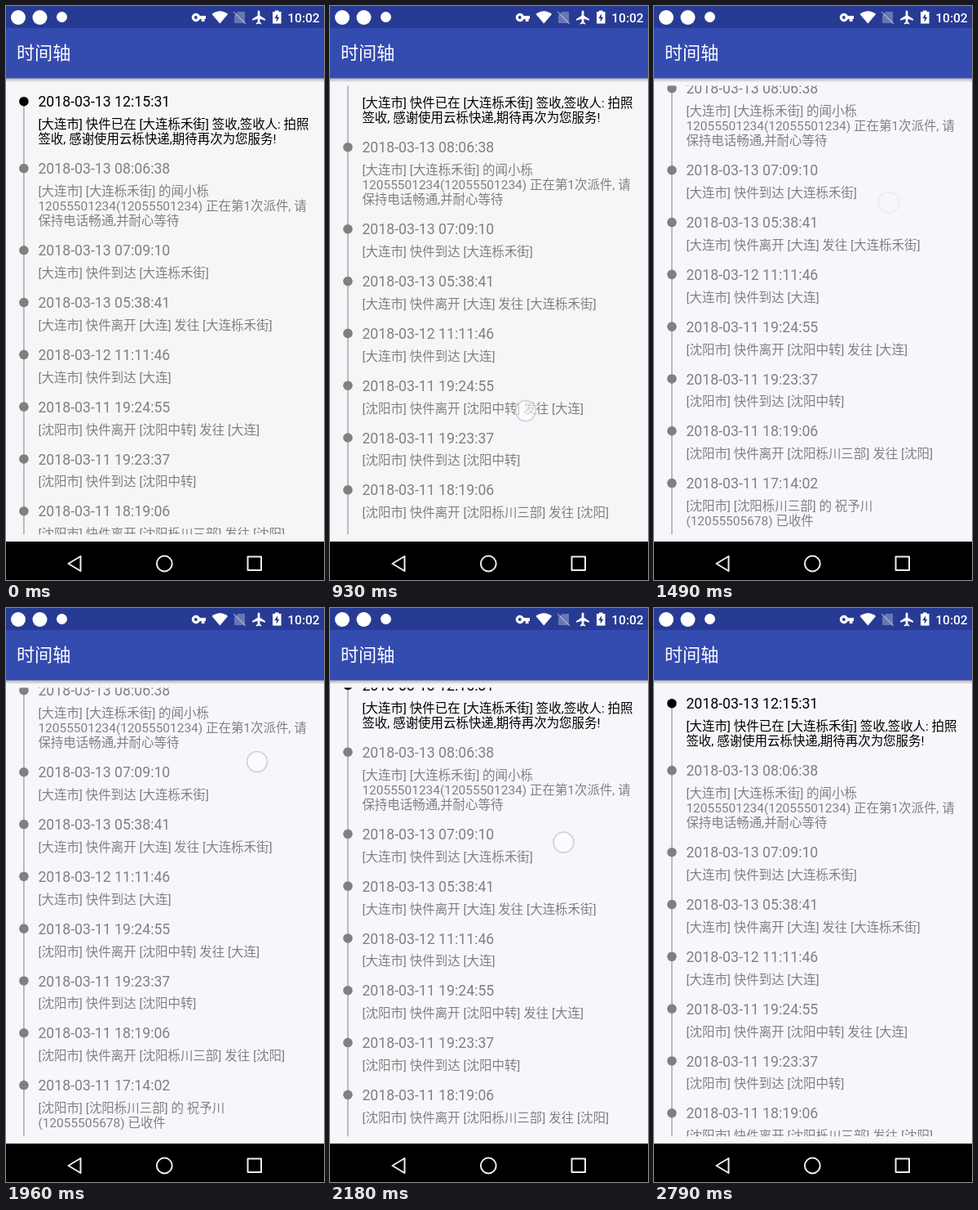
Recreate the animation shown at these times as an HTML page with a canvas. Size 390x702 px, loop 2870 ms.

```html
<!DOCTYPE html>
<html lang="zh-CN">
<head>
<meta charset="utf-8">
<title>时间轴</title>
<style>
html, body { margin: 0; width: 100%; height: 100%; overflow: hidden; background: #000; }
canvas { display: block; width: 390px; height: 702px; }
</style>
</head>
<body>
<canvas id="stage"></canvas>
<script>
const W = 390, H = 702, LOOP = 2870;
const FONT = 'Roboto, "Noto Sans CJK SC", "Noto Sans CJK", sans-serif';
const LIST_TOP = 97.5, LIST_BOTTOM = 646.3, LINE_HEIGHT = 18.15, ROW_BASE = 45.65;
const MAX_SCROLL = 98, DRAG_SLACK = 23, FADE = 200;

const canvas = document.getElementById('stage');
const ctx = canvas.getContext('2d');
const ratio = window.devicePixelRatio || 1;
canvas.width = W * ratio;
canvas.height = H * ratio;

const rows = [
  ['2018-03-13 12:15:31', '[大连市] 快件已在 [大连栎禾街] 签收,签收人: 拍照', '签收, 感谢使用云栎快递,期待再次为您服务!'],
  ['2018-03-13 08:06:38', '[大连市] [大连栎禾街] 的闻小栎', '12055501234(12055501234) 正在第1次派件, 请', '保持电话畅通,并耐心等待'],
  ['2018-03-13 07:09:10', '[大连市] 快件到达 [大连栎禾街]'],
  ['2018-03-13 05:38:41', '[大连市] 快件离开 [大连] 发往 [大连栎禾街]'],
  ['2018-03-12 11:11:46', '[大连市] 快件到达 [大连]'],
  ['2018-03-11 19:24:55', '[沈阳市] 快件离开 [沈阳中转] 发往 [大连]'],
  ['2018-03-11 19:23:37', '[沈阳市] 快件到达 [沈阳中转]'],
  ['2018-03-11 18:19:06', '[沈阳市] 快件离开 [沈阳栎川三部] 发往 [沈阳]'],
  ['2018-03-11 17:14:02', '[沈阳市] [沈阳栎川三部] 的 祝予川', '(12055505678) 已收件']
];

// Finger paths as [time, x, y]
const swipeUp = [[850, 231, 544], [1100, 259, 391], [1340, 288, 240]];
const swipeDown = [[1960, 308, 188], [2100, 293, 249], [2430, 266, 404], [2590, 256, 462]];

const ticks = [0, 850, 930, 1020, 1100, 1180, 1250, 1330, 1410, 1480, 1540,
  1960, 2030, 2100, 2180, 2260, 2350, 2430, 2510, 2580, 2650, 2720, 2790];

const clamp = (v, lo, hi) => Math.min(hi, Math.max(lo, v));

function along(path, t) {
  const first = path[0], last = path[path.length - 1];
  t = clamp(t, first[0], last[0]);
  let i = 1;
  while (t > path[i][0]) i++;
  const a = path[i - 1], b = path[i], k = (t - a[0]) / (b[0] - a[0]);
  return { x: a[1] + (b[1] - a[1]) * k, y: a[2] + (b[2] - a[2]) * k };
}

function scrollAt(t) {
  if (t < 1960) return clamp(swipeUp[0][2] - along(swipeUp, t).y - DRAG_SLACK, 0, MAX_SCROLL);
  return MAX_SCROLL - clamp(along(swipeDown, t).y - swipeDown[0][2] - DRAG_SLACK, 0, MAX_SCROLL);
}

function text(str, x, y, size, color, weight = 400) {
  ctx.font = `${weight} ${size}px ${FONT}`;
  ctx.fillStyle = color;
  ctx.fillText(str, x, y);
}

function rect(x, y, w, h, color) {
  ctx.fillStyle = color;
  ctx.fillRect(x, y, w, h);
}

function disc(x, y, r, color) {
  ctx.fillStyle = color;
  ctx.beginPath();
  ctx.arc(x, y, r, 0, Math.PI * 2);
  ctx.fill();
}

function shape(d, color, x = 0, y = 0) {
  ctx.save();
  ctx.translate(x, y);
  ctx.fillStyle = color;
  ctx.fill(new Path2D(d), 'evenodd');
  ctx.restore();
}

function drawList(scroll) {
  ctx.save();
  ctx.beginPath();
  ctx.rect(0, LIST_TOP, W, LIST_BOTTOM - LIST_TOP);
  ctx.clip();
  let y = LIST_TOP - scroll;
  rect(21.4, y + 19.5, 1.1, 700, '#8c8c90');
  rows.forEach(([date, ...lines], i) => {
    const color = i ? '#808083' : '#000';
    disc(21.9, y + 19.2, 5.8, color);
    text(date, 39.4, y + 25.8, 17.7, color);
    lines.forEach((line, n) => text(line, 39.4, y + 52.6 + n * LINE_HEIGHT, 15.46, color));
    y += ROW_BASE + lines.length * LINE_HEIGHT;
  });
  ctx.restore();
}

function drawStatusBar() {
  const white = '#fff';
  rect(0, 0, W, 27, '#283b94');
  disc(15, 14, 9, white);
  disc(41.5, 14, 9, white);
  disc(68.5, 13.5, 6.5, white);
  // key
  shape('M10.2 -2H17.5V2H16V5H12.2V2H10.2A5.2 5.2 0 1 1 10.2 -2ZM7.2 0A1.9 1.9 0 1 0 3.4 0A1.9 1.9 0 1 0 7.2 0Z', white, 227.5, 14);
  // wifi
  shape('M0 4.5Q9.8 -3 19.6 4.5L9.8 16Z', white, 252.5, 5.5);
  // missing SIM card
  shape('M4.5 0H12Q13 0 13 1V14H1Q0 14 0 13V4.5Z', 'rgba(255,255,255,.3)', 280, 7);
  ctx.strokeStyle = 'rgba(255,255,255,.45)';
  ctx.lineWidth = 1.3;
  ctx.beginPath();
  ctx.moveTo(279, 7);
  ctx.lineTo(294, 22);
  ctx.stroke();
  // airplane
  shape('M-1.4 -7Q0 -9.5 1.4 -7V-2L8 2.2V4L1.4 2V6L3.2 7.4V8.7L0 7.8L-3.2 8.7V7.4L-1.4 6V2L-8 4V2.2L-1.4 -2Z', white, 310, 13.7);
  // charging battery
  shape('M3 1.5V0H7.5V1.5H10.5V16H0V1.5ZM6 4L2.3 9.6H4.7V14L8.3 8.2H6Z', white, 327, 5.5);
  text('10:02', 345.3, 19.5, 15.5, white, 500);
}

function drawAppBar() {
  rect(0, 27, W, 61.5, '#344bb0');
  const shadow = ctx.createLinearGradient(0, 88.5, 0, 93.5);
  shadow.addColorStop(0, 'rgba(0,0,0,.28)');
  shadow.addColorStop(1, 'rgba(0,0,0,0)');
  rect(0, 88.5, W, 5, shadow);
  text('时间轴', 13, 65.3, 22.1, '#fff');
}

function drawNavBar() {
  rect(0, 655, W, 47, '#000');
  ctx.strokeStyle = '#eee';
  ctx.lineWidth = 2;
  ctx.lineJoin = 'round';
  ctx.stroke(new Path2D('M76.5 682L91.5 673V691Z'));
  ctx.beginPath();
  ctx.arc(194.3, 682, 9.4, 0, Math.PI * 2);
  ctx.stroke();
  ctx.strokeRect(296.5, 673.5, 16.5, 16.5);
}

function drawTouch(path, t) {
  const end = path[path.length - 1][0];
  if (t < path[0][0] || t >= end + FADE) return;
  const { x, y } = along(path, t);
  ctx.save();
  ctx.globalAlpha = clamp(1 - (t - end) / FADE, 0, 1);
  disc(x, y, 13, 'rgba(255,255,255,.6)');
  ctx.strokeStyle = 'rgba(190,188,202,.65)';
  ctx.lineWidth = 1.8;
  ctx.beginPath();
  ctx.arc(x, y, 12.4, 0, Math.PI * 2);
  ctx.stroke();
  ctx.restore();
}

function draw(time) {
  const t = ticks.filter(tick => tick <= time).pop();
  ctx.setTransform(ratio, 0, 0, ratio, 0, 0);
  rect(0, 0, W, H, t < 1410 ? '#f5f6f8' : '#f8f6fa');
  drawList(scrollAt(t));
  drawAppBar();
  drawStatusBar();
  drawNavBar();
  drawTouch(swipeUp, t);
  drawTouch(swipeDown, t);
}

const start = performance.now();
function loop() {
  draw((performance.now() - start) % LOOP);
  requestAnimationFrame(loop);
}
loop();
</script>
</body>
</html>
```
